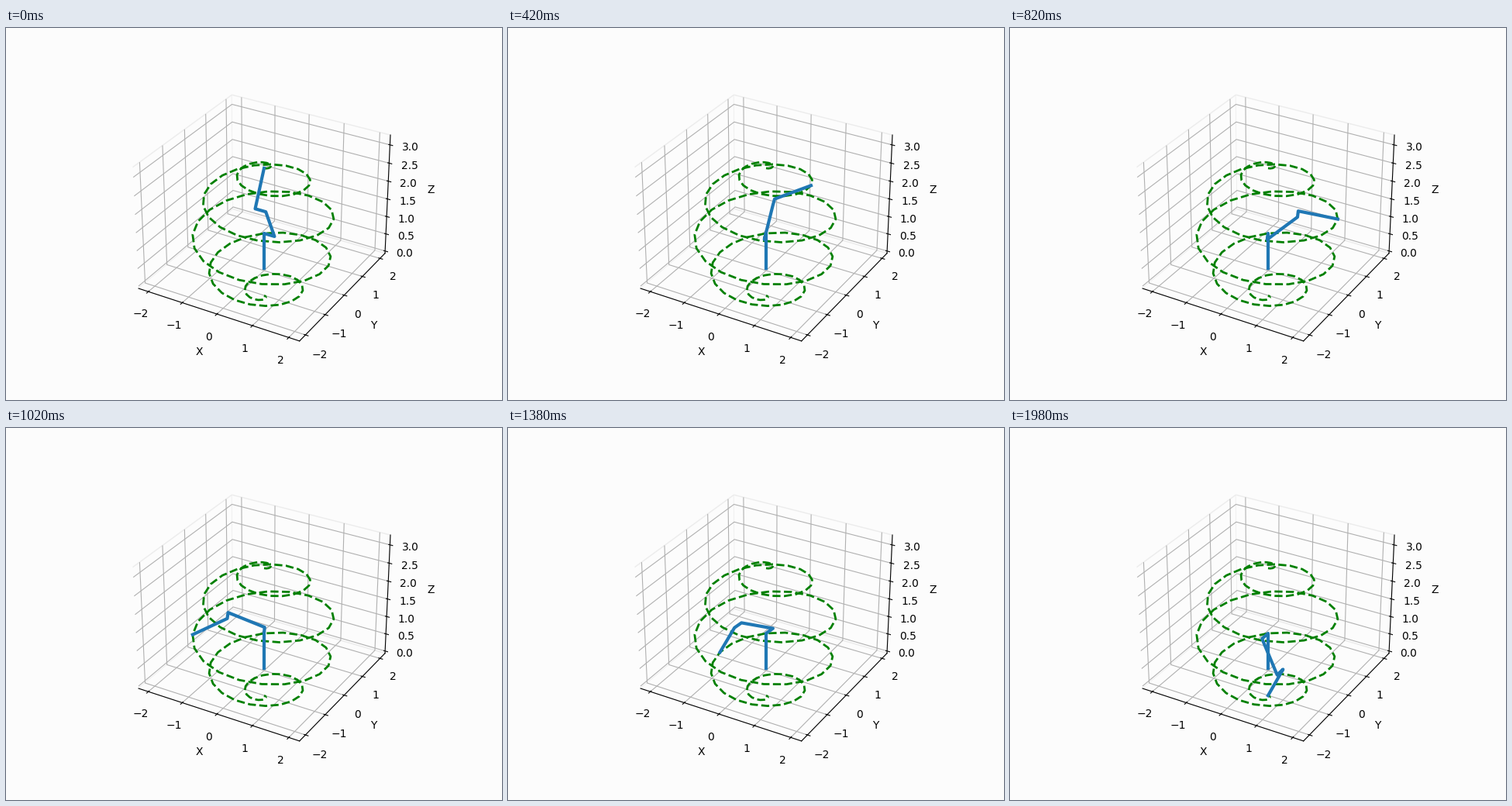
Recreate the animation shown at these times as a matplotlib script. Size 640x480 px, loop 2 s.

```python
import numpy as np
import matplotlib.pyplot as plt
from matplotlib.animation import FuncAnimation

FRAMES = 100
REACH = 1.8      # radius of the sphere the spiral lies on
LINK = 1.0       # length of both arm links, also the shoulder height
OFFSET = 0.3     # sideways step at shoulder and elbow
BACK = "#fcfcfc"
EDGE = "#ececec"

phi = np.linspace(0, np.pi, FRAMES)
path = np.array([
    REACH * np.sin(phi) * np.cos(10 * phi),
    REACH * np.sin(phi) * np.sin(10 * phi),
    LINK + REACH * np.cos(phi),
])


def joints(target):
    """Joint positions of the arm (3 x 6) with its tip on the target."""
    x, y, z = target
    r = np.hypot(x, y)
    side = np.arctan2(y, x) - np.arctan2(r, 0)
    across = OFFSET * np.array([np.cos(side), np.sin(side), 0])
    ahead = np.array([-np.sin(side), np.cos(side), 0])
    up = np.array([0, 0, 1])

    # Elbow-up solution of the two-link chain
    dz = z - LINK
    lift = np.arctan2(dz, r) + np.arccos(np.hypot(r, dz) / (2 * LINK))
    shoulder = LINK * up
    elbow = shoulder + LINK * (np.cos(lift) * ahead + np.sin(lift) * up)
    return np.array([0 * up, shoulder, shoulder + across,
                     elbow + across, elbow, target]).T


def padded(lo, hi):
    pad = (hi - lo) / 48
    return lo - pad, hi + pad


fig = plt.figure(figsize=(6.4, 4.8), dpi=100, facecolor=BACK)
ax = fig.add_subplot(projection="3d", facecolor=BACK)
ax.plot(*path, "--", color="green", lw=2)
arm, = ax.plot(*joints(path[:, 0]), color="C0", lw=3)

ax.set(xlabel="X", ylabel="Y", zlabel="Z",
       xticks=range(-2, 3), yticks=range(-2, 3), zticks=np.arange(0, 3.1, 0.5))
ax.set(xlim=padded(-2.2, 2.2), ylim=padded(-2.2, 2.2), zlim=padded(0, 3.2))
for axis in (ax.xaxis, ax.yaxis, ax.zaxis):
    axis.set_pane_color(BACK, 1)
    axis.pane.set_edgecolor(EDGE)


def update(i):
    arm.set_data_3d(*joints(path[:, i]))
    return arm,


anim = FuncAnimation(fig, update, frames=FRAMES, interval=20,
                     repeat=True, repeat_delay=0)
plt.show()
```
